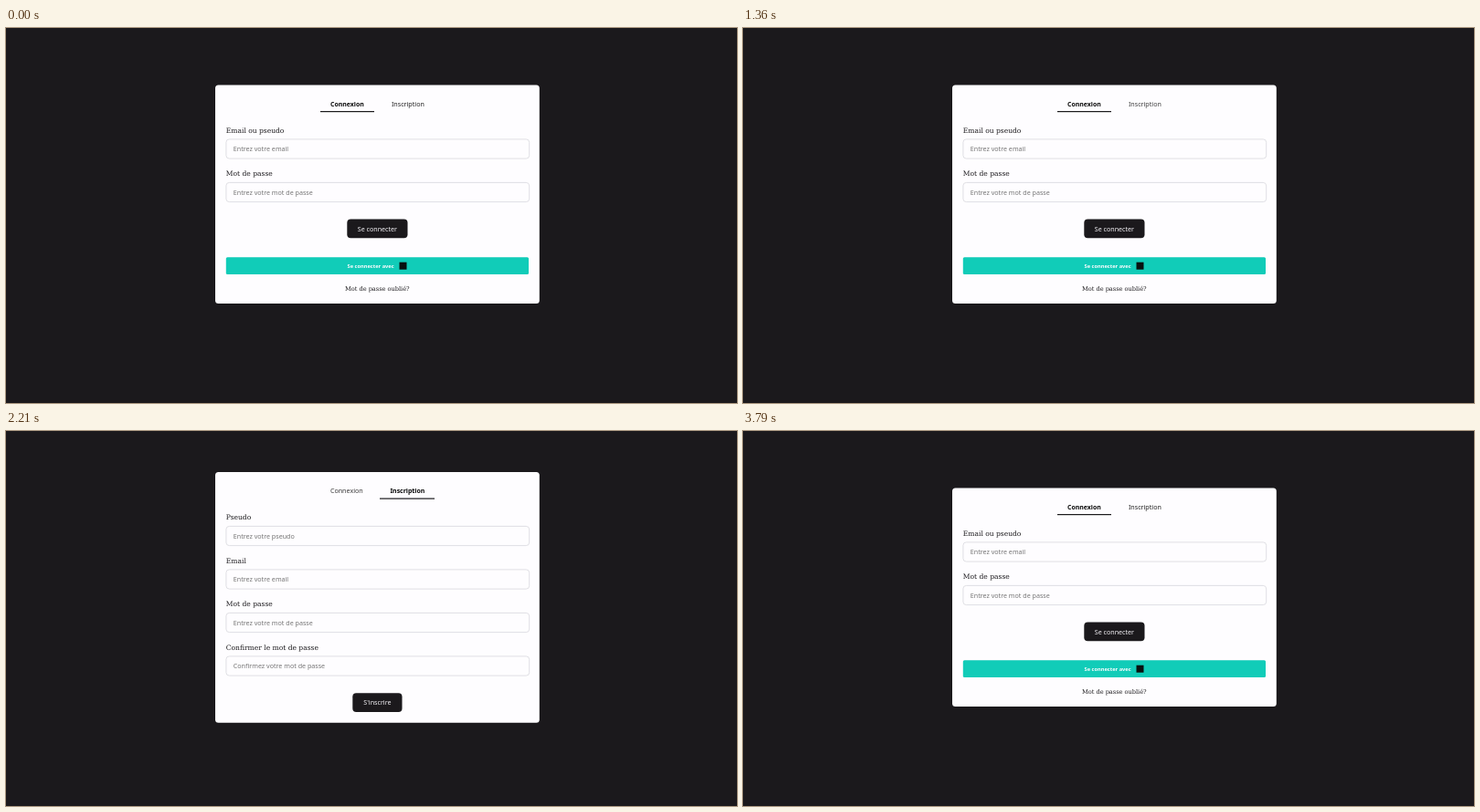
Recreate the animation shown at these times as an HTML page with a canvas. Size 800 by 411 pixels, loop 4880 ms.

```html
<!DOCTYPE html>
<html lang="fr">
<head>
<meta charset="utf-8">
<title>Connexion</title>
<style>
  html, body { margin: 0; width: 100%; height: 100%; overflow: hidden; background: #1b191c; }
  canvas { display: block; width: 800px; height: 411px; }
</style>
</head>
<body>
<canvas id="stage"></canvas>
<script>
const LOOP = 4880;
const SIGNUP_AT = 1480, LOGIN_AT = 3480, FADE = 190;
const INK = '#1b191c', PAPER = '#fefdff', TEAL = '#11ccb8';
const SANS = '"Noto Sans", sans-serif';
const SERIF = '"DejaVu Serif", serif';

const canvas = document.getElementById('stage');
const ctx = canvas.getContext('2d');
const ratio = window.devicePixelRatio || 1;
canvas.width = 800 * ratio;
canvas.height = 411 * ratio;
ctx.scale(ratio, ratio);

const mix = (a, b, p) => a + (b - a) * p;

// Eased progress from 0 to 1 between two times
function ramp(t, from, to) {
  const p = Math.min(1, Math.max(0, (t - from) / (to - from)));
  return p * p * (3 - 2 * p);
}

function box(x, y, w, h, r, fill, stroke) {
  ctx.beginPath();
  ctx.roundRect(x, y, w, h, r);
  if (fill) {
    ctx.fillStyle = fill;
    ctx.fill();
  }
  if (stroke) {
    ctx.strokeStyle = stroke;
    ctx.lineWidth = 0.8;
    ctx.stroke();
  }
}

function text(str, x, y, font, color, align = 'left') {
  ctx.font = font;
  ctx.fillStyle = color;
  ctx.textAlign = align;
  ctx.fillText(str, x, y);
}

function field(label, hint, top) {
  text(label, 240.8, top + 52.4, `7.55px ${SERIF}`, INK);
  box(240.9, top + 59.4, 331.8, 21.2, 3.5, PAPER, '#d9d8dd');
  text(hint, 248.8, top + 72.8, `7.13px ${SANS}`, '#757575');
}

function button(str, x, y, w) {
  box(x, y, w, 20.8, 4, INK);
  text(str, x + w / 2, y + 13, `7.13px ${SANS}`, '#f7f5f9', 'center');
}

function tab(str, center, drift, left, width, top, active, shade) {
  const weight = Math.round(mix(400, 700, active));
  const size = mix(7.13, 6.93, active);
  const level = Math.round(mix(shade, 8, active));
  text(str, center + drift * (1 - active), top + 23.1,
    `${weight} ${size}px ${SANS}`, `rgb(${level},${level},${level})`, 'center');
  ctx.fillStyle = `rgba(27,25,28,${active})`;
  ctx.fillRect(left, top + 28.5, width, 1.2);
}

function loginForm(top) {
  field('Email ou pseudo', 'Entrez votre email', top);
  field('Mot de passe', 'Entrez votre mot de passe', top + 47.5);
  button('Se connecter', 373.3, top + 147, 66.2);
  box(240.8, top + 188.7, 331.2, 18.8, 1.5, TEAL);
  text('Se connecter avec', 373.6, top + 200.6, `700 5.7px ${SANS}`, PAPER);
  ctx.fillStyle = '#08110f';
  ctx.fillRect(430.5, top + 194.2, 8, 8);
  text('Mot de passe oublié?', 406.3, top + 225.8, `6.6px ${SERIF}`, INK, 'center');
}

function signupForm(top) {
  const rows = [
    ['Pseudo', 'Entrez votre pseudo'],
    ['Email', 'Entrez votre email'],
    ['Mot de passe', 'Entrez votre mot de passe'],
    ['Confirmer le mot de passe', 'Confirmez votre mot de passe']
  ];
  rows.forEach(([label, hint], i) => field(label, hint, top + i * 47.5));
  button("S'inscrire", 379.3, top + 242.2, 54.2);
}

function draw(t) {
  const signup = t >= SIGNUP_AT && t < LOGIN_AT;
  const top = signup ? 45 : 62.5;
  const active = ramp(t, SIGNUP_AT, SIGNUP_AT + FADE) - ramp(t, LOGIN_AT - 20, LOGIN_AT + FADE);
  const hover = ramp(t, 790, 1090) - ramp(t, LOGIN_AT, LOGIN_AT + FADE);

  ctx.fillStyle = INK;
  ctx.fillRect(0, 0, 800, 411);
  box(229, top, 354.8, signup ? 274.8 : 239.6, 3.5, PAPER);
  tab('Connexion', 373.4, -0.6, 344, 59, top, 1 - active, 58);
  tab('Inscription', 439.3, 0.6, 409, 60, top, active, mix(34, 62, hover));
  (signup ? signupForm : loginForm)(top);
}

const start = performance.now();
function tick() {
  draw((performance.now() - start) % LOOP);
  requestAnimationFrame(tick);
}
tick();
</script>
</body>
</html>
```
